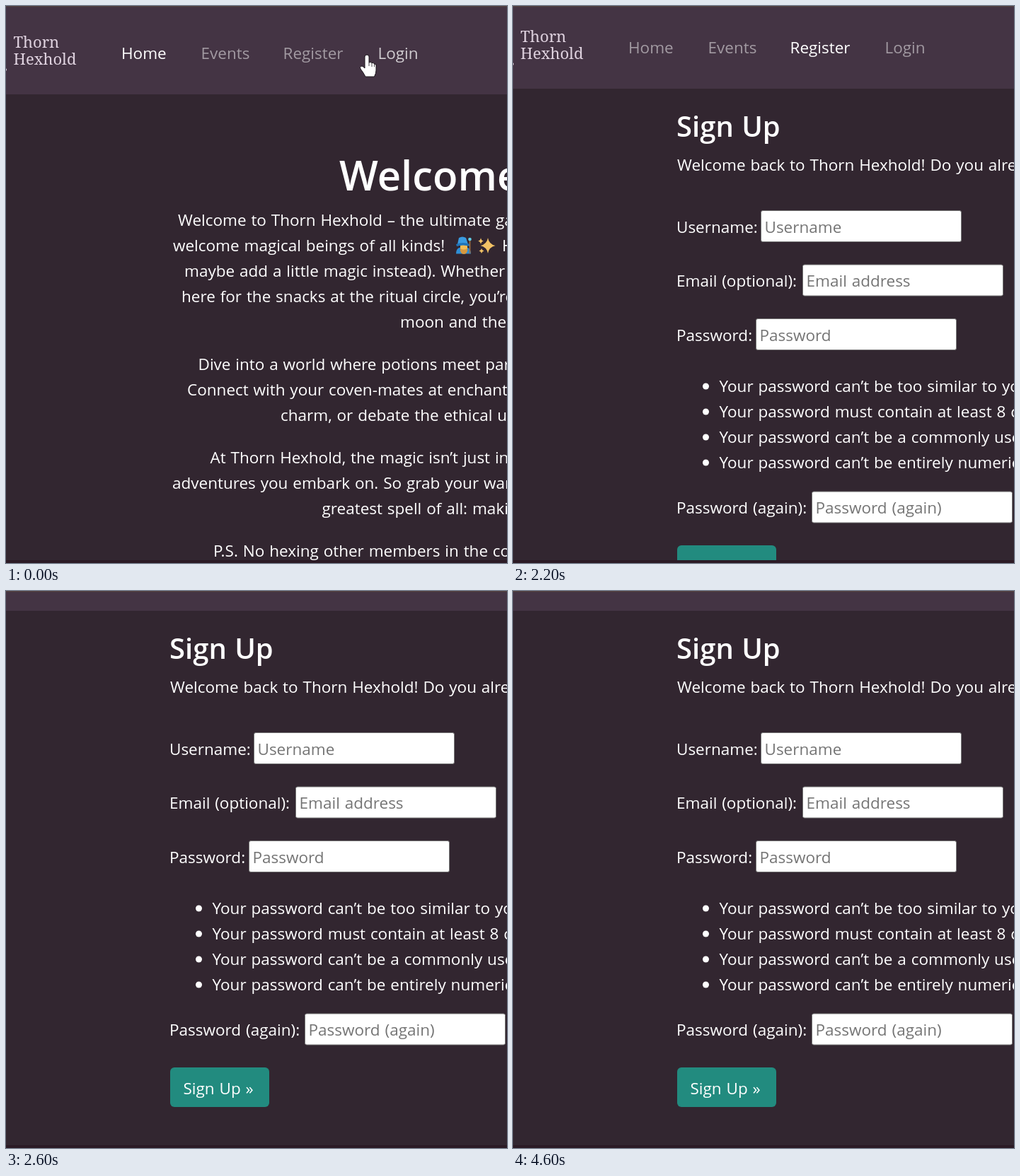
An HTML page for the animation above (4700 ms loop, 708x788 px).

```html
<!DOCTYPE html>
<html lang="en">
<head>
<meta charset="utf-8">
<title>Thorn Hexhold</title>
<style>
  html, body { margin: 0; width: 100%; height: 100%; overflow: hidden; background: #322630; }
  svg { display: block; width: 708px; height: 788px; }
  text { font: 440 22.5px "Open Sans", "Noto Sans", sans-serif; word-spacing: 1px; fill: #fff; white-space: pre; }
  .title { font-size: 58px; font-weight: 600; }
  .heading { font-size: 40px; font-weight: 600; }
  .brand { font: 500 22px "Noto Serif", serif; fill: #e0d3e0; }
  .hint { fill: #757575; }
  .pointer { fill: #fff; stroke: #1d171d; stroke-width: 1; stroke-linejoin: round; }
</style>
</head>
<body>
<svg viewBox="0 0 708 788">
  <rect width="708" height="788" fill="#322630"/>
  <g id="page">
    <rect width="708" height="125" fill="#443444"/>
    <circle cx="-1" cy="90" r="2" fill="#e0d3e0"/>
    <text class="brand" x="10.500" y="59">Thorn</text>
    <text class="brand" x="10.500" y="83">Hexhold</text>
    <g id="nav"></g>
    <g id="home">
      <g id="mage">
        <path d="M636 350.500q0-8 6-9h9q6 1 6 9z" fill="#2f8fd6"/>
        <path d="M642 338h10v7q-1 5-5 5t-5-5z" fill="#f3bd55"/>
        <path d="M642 343q5 3 10 0v3q-1 5-5 5t-5-5z" fill="#d6983f"/>
        <path d="M638 337l2-9q5-3 10 0l3 9z" fill="#3a9be0"/>
        <path d="M636 337q10-4 20 0l-1 3q-9-3-18 0z" fill="#1f74b8"/>
        <path d="M655.500 331v19" stroke="#9a6b42" stroke-width="1.800"/>
        <circle cx="655.500" cy="330" r="2.300" fill="#62d0e8"/>
      </g>
      <g id="sparkles" fill="#f2c265">
        <path d="M681 328q1.500 9 10.500 11-9 2-10.500 11-1.500-9-10.500-11 9-2 10.500-11z"/>
        <path d="M671 328q.7 4 4 4.500-3.300.7-4 4.500-.7-3.800-4-4.500 3.300-.5 4-4.500z"/>
        <path d="M672 343q.6 3 3.500 3.500-2.900.6-3.500 3.500-.6-2.900-3.500-3.500 2.900-.5 3.500-3.500z"/>
      </g>
    </g>
    <g id="register"></g>
  </g>
  <rect width="708" height="1.200" fill="#54403f"/>
  <rect y="784" width="708" height="4" fill="#2b1a25"/>
  <g id="hand" class="pointer">
    <path d="M-3 3Q-3 0 0 0T3 3V11Q5 9.500 7 11.500Q9 10.500 10.500 13Q13 12.500 13 15.500V22Q13 26 10.500 31H-2Q-5 25-9 20Q-10.500 17-8 16Q-6 15.500-3 19Z"/>
    <path d="M3 11v5M7 12v5M10.500 13v4" fill="none" stroke-width=".8"/>
  </g>
  <path id="arrow" class="pointer" d="M0 0V23L5 18.500L8.500 26L12.500 24L9 17H16.500Z"/>
</svg>
<script>
const LOOP = 4700, STEP = 100, PAGE_SWAP = 700;
const $ = id => document.getElementById(id);

function add(parent, tag, attrs, content = "") {
  const el = document.createElementNS("http://www.w3.org/2000/svg", tag);
  for (const key in attrs) el.setAttribute(key, attrs[key]);
  el.textContent = content;
  return parent.appendChild(el);
}
const write = (parent, x, y, content, cls = "") =>
  add(parent, "text", { x, y, class: cls }, content);

const links = [["Home", 163], ["Events", 275.5], ["Register", 391.5], ["Login", 525.5]]
  .map(([name, x]) => ({ name, x, el: write($("nav"), x, 75, name) }));
links.forEach((link, i) => {
  link.left = link.x - 24;
  link.right = i < 3 ? links[i + 1].x - 24 : 608;
});

write($("home"), 471, 261, "Welcome to", "title");
write($("home"), 701, 347, "Here");
[
  [311, [243, "Welcome to Thorn Hexhold – the ultimate gathering"],
        [236, "welcome magical beings of all kinds!"],
        [252, "maybe add a little magic instead). Whether you"],
        [248, "here for the snacks at the ritual circle, you’re in"],
        [557, "moon and the stars"]],
  [515, [271.5, "Dive into a world where potions meet parties"],
        [256, "Connect with your coven-mates at enchanting"],
        [388, "charm, or debate the ethical use of"]],
  [647, [288.5, "At Thorn Hexhold, the magic isn’t just in the"],
        [235, "adventures you embark on. So grab your wand"],
        [446.5, "greatest spell of all: making"]],
  [779, [293, "P.S. No hexing other members in the comments"]],
].forEach(([top, ...lines]) =>
  lines.forEach(([x, content], i) => write($("home"), x, top + 36 * i, content)));

const form = $("register");
write(form, 231, 193, "Sign Up", "heading");
write(form, 232, 241, "Welcome back to Thorn Hexhold! Do you already");

function field(label, hint, x, y) {
  write(form, 231, y + 31.5, label);
  add(form, "rect", { x: x + .5, y: y + .5, width: 283, height: 44, rx: 2.5,
    fill: "#fff", stroke: "#767676" });
  write(form, x + 5.5, y + 31.5, hint, "hint");
}
field("Username:", "Username", 350, 297);
field("Email (optional):", "Email address", 409, 373.5);
field("Password:", "Password", 343, 450);
field("Password (again):", "Password (again)", 422, 694.5);

[
  "Your password can’t be too similar to your other",
  "Your password must contain at least 8 characters.",
  "Your password can’t be a commonly used password.",
  "Your password can’t be entirely numeric.",
].forEach((rule, i) => {
  add(form, "circle", { cx: 272.5, cy: 546 + 36 * i, r: 4.5, fill: "#fff" });
  write(form, 291.5, 554 + 36 * i, rule);
});
add(form, "rect", { x: 232, y: 771, width: 140, height: 56, rx: 6, fill: "#228b7f" });
write(form, 250.5, 809, "Sign Up »");

// Keys are [time, ...values]; values are interpolated linearly and held outside the range.
function track(keys, t) {
  const next = keys.findIndex(key => key[0] > t);
  if (next < 0) return keys[keys.length - 1].slice(1);
  if (next === 0) return keys[0].slice(1);
  const a = keys[next - 1], b = keys[next], k = (t - a[0]) / (b[0] - a[0]);
  return a.slice(1).map((v, i) => v + (b[i + 1] - v) * k);
}
const pointerPath = [
  [0, 510, 69], [100, 494, 66], [300, 450, 58], [500, 436, 56], [700, 436, 56],
  [900, 446, 57], [1400, 446, 57], [1800, 668, 230], [2000, 740, 300],
  [3100, 740, -40], [3200, 672, 4], [3300, 663, -7], [3400, 655, -40],
];
const scrollPath = [[2100, 0], [2200, 8], [2300, 46], [2400, 79], [2500, 93], [2600, 97]];

function render(t) {
  const registering = t >= PAGE_SWAP;
  const [x, y] = track(pointerPath, t);
  const [scroll] = track(scrollPath, t);
  const hovered = y > 40 && y < 95 && scroll === 0 &&
    links.find(link => x >= link.left && x < link.right);
  const active = registering ? "Register" : "Home";

  $("page").setAttribute("transform", `translate(0 ${-scroll})`);
  $("home").style.display = registering ? "none" : "";
  $("register").style.display = registering ? "" : "none";
  for (const link of links) {
    const opacity = link.name === active ? 1 : link === hovered ? .75 : .5;
    link.el.setAttribute("fill-opacity", opacity);
  }

  const loading = t >= 600 && t < 800;
  const pointing = hovered && !loading;
  $("hand").style.display = pointing ? "" : "none";
  $("arrow").style.display = pointing ? "none" : "";
  $(pointing ? "hand" : "arrow").setAttribute("transform", `translate(${x} ${y})`);
}

const start = performance.now();
function tick() {
  const t = (performance.now() - start) % LOOP;
  render(Math.floor(t / STEP) * STEP);
  requestAnimationFrame(tick);
}
tick();
</script>
</body>
</html>
```
